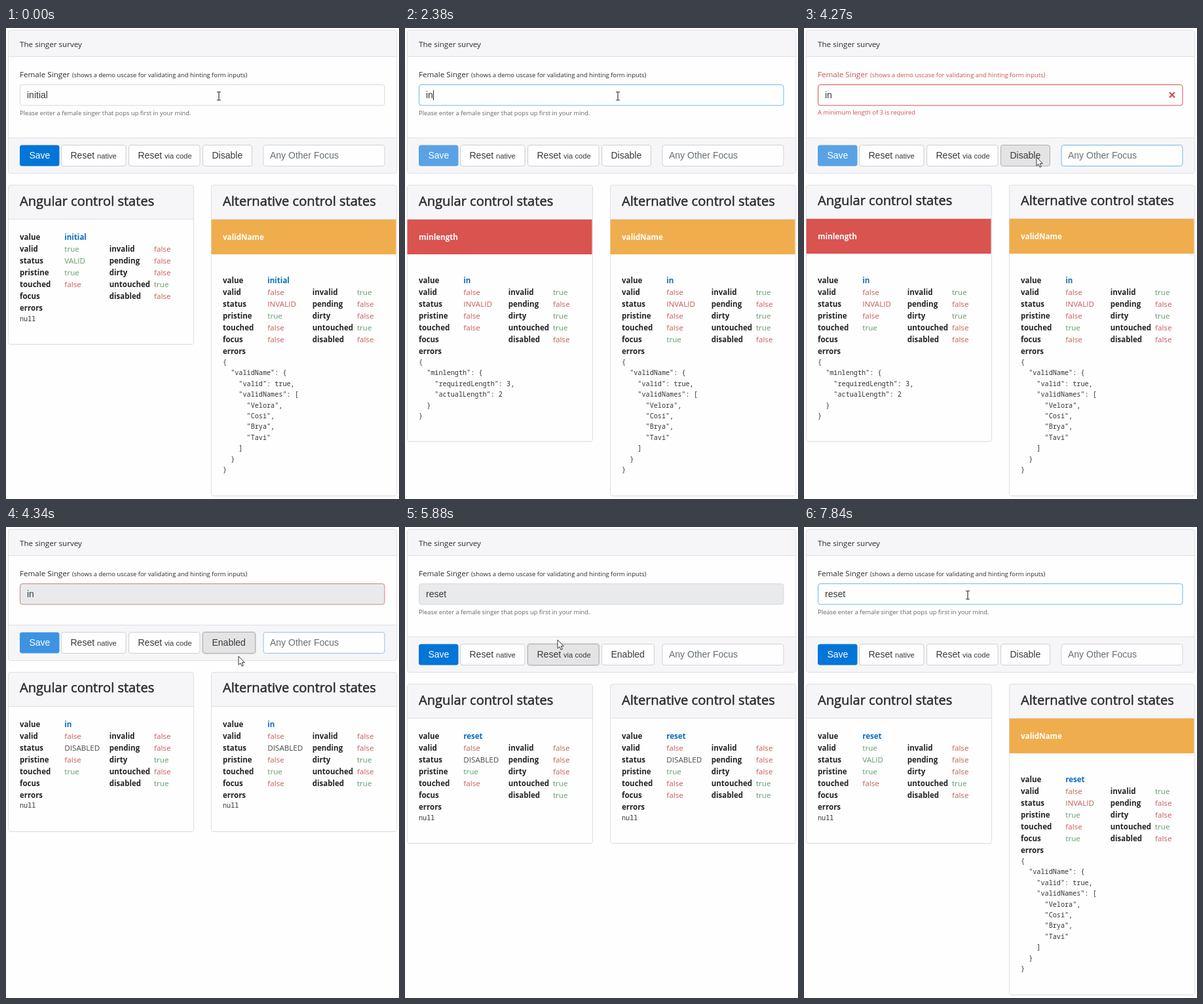
These frames come from a looping animation (600x718 px, 8000 ms). An HTML page:

```html
<!DOCTYPE html>
<html lang="en">
<head>
<meta charset="utf-8">
<title>Form control states</title>
<style>
  html, body { margin: 0; width: 100%; height: 100%; overflow: hidden; background: #fefefe; }
  svg { display: block; width: 600px; height: 718px; }
  text { white-space: pre; font: 11.65px "Open Sans", "Noto Sans", sans-serif; fill: #292b2c; }
  .small { font-size: 9.43px; }
  .hint { font-size: 9.4px; fill: #5f676c; }
  .title { font-size: 20.1px; stroke: #292b2c; stroke-width: .5; }
  .key { font-size: 11.5px; font-weight: 700; fill: #222425; }
  .value { font-size: 11.5px; font-weight: 700; fill: #0a6cbf; }
  .banner { font-weight: 700; fill: #fff; }
  .yes { fill: #629c6b; }
  .no { fill: #c85a58; }
  .off { fill: #46494c; }
  .code { font: 10.17px "Noto Sans Mono", "DejaVu Sans Mono", monospace; fill: #333; }
  .ui { font: 14px "Liberation Sans", Arial, sans-serif; fill: #36393b; }
  .ui tspan { font-size: 11.2px; }
  .soft { fill: #666e74; }
  .bright { fill: #fff; }
  text.red { fill: #cb5250; }
</style>
</head>
<body>
<svg id="stage" viewBox="0 0 600 718"></svg>
<script>
const LOOP = 8000, STEP = 70;
const stage = document.getElementById('stage');
const pen = document.createElement('canvas').getContext('2d');
pen.font = '14px "Liberation Sans", Arial, sans-serif';

const PANEL = '#f6f6f9', PAGE = '#fefefe', LINE = '#dfdfe4';
const NAMES = ['Velora', 'Cosi', 'Brya', 'Tavi'];

// What the form does, as changes to its state
const EVENTS = [
  [0, { value: 'initial', focus: '', caret: false, pristine: true, touched: false, short: false, disabled: false }],
  [280, { focus: 'name', caret: true }],
  [560, { caret: false }],
  [840, { caret: true }],
  [1120, { caret: false }],
  [1260, { value: 'initia', pristine: false, caret: true }],
  [1400, { value: 'initi' }],
  [1610, { value: 'init' }],
  [1750, { value: 'ini' }],
  [1890, { value: 'in' }],
  [2030, { short: true }],
  [2170, { caret: false }],
  [2380, { caret: true }],
  [2660, { caret: false }],
  [2940, { caret: true }],
  [3220, { focus: 'other', touched: true, caret: false }],
  [4340, { focus: 'toggle', disabled: true }],
  [5880, { focus: 'code', value: 'reset', pristine: true, touched: false, short: false }],
  [6930, { focus: 'toggle', disabled: false }],
  [7630, { focus: 'name', caret: true }],
  [7840, { caret: false }]
];

// Pointer way: time, x, y
const WAY = [
  [0, 325, 104], [2590, 325, 104], [2940, 452, 192],
  [3570, 452, 192], [4060, 355, 197],
  [4900, 355, 197], [5110, 239, 155], [5460, 233, 172],
  [6300, 233, 172], [6650, 361, 193],
  [7210, 361, 193], [7490, 250, 104], [LOOP, 250, 104]
];

function stateAt(t) {
  const s = {};
  for (const [at, change] of EVENTS) if (at <= t) Object.assign(s, change);
  s.failed = s.touched && s.short && !s.disabled;
  return s;
}

function pointerAt(t) {
  const i = WAY.findIndex(p => p[0] > t);
  const [a, b] = [WAY[i - 1], WAY[i]];
  const k = (t - a[0]) / (b[0] - a[0]);
  return { x: a[1] + (b[1] - a[1]) * k, y: a[2] + (b[2] - a[2]) * k };
}

// Three-step colour fade after a change of state
function fade(t, pick) {
  const shades = [0, 1, 2].map(n => pick(stateAt(Math.max(0, t - n * STEP))));
  return `rgb(${[0, 1, 2].map(c => Math.round(shades.reduce((sum, s) => sum + s[c], 0) / 3))})`;
}

const borderShade = s =>
  s.focus === 'name' ? [116, 184, 230] : s.failed ? [207, 86, 84] : [217, 217, 220];
const otherShade = s => s.focus === 'other' ? [116, 184, 230] : [211, 211, 214];
const saveShade = s => s.short && !s.disabled ? [90, 162, 230] : [2, 117, 216];

const text = (x, y, body, cls = '') => `<text x="${x}" y="${y}" class="${cls}">${body}</text>`;

const rect = (x, y, w, h, fill, extra = '') =>
  `<rect x="${x}" y="${y}" width="${w}" height="${h}" fill="${fill}" ${extra}/>`;

const box = (x, y, w, h, fill, stroke) =>
  rect(x + .5, y + .5, w - 1, h - 1, fill, `rx="3.5" stroke="${stroke}"`);

const rule = (x, y, w) => rect(x, y, w, 1, LINE);

function button(x, y, w, body, lit, focused) {
  const ring = focused ? rect(x - .5, y - .5, w + 1, 34, 'none', 'rx="4" stroke="#ccc" stroke-opacity=".5" stroke-width="1.5"') : '';
  const on = lit || focused;
  return ring + box(x, y, w, 33, on ? '#e4e4e5' : PAGE, on ? '#b0b0b2' : '#d0d0d2') + text(x + 14.5, y + 21, body, 'ui');
}

function form(s, t, p) {
  const dy = s.disabled && s.touched ? -18 : 0;
  const red = s.failed ? 'red' : '';
  const top = 178 + dy;
  const over = (x, w) => p.x >= x && p.x <= x + w && p.y >= top && p.y <= top + 33;
  const toggleWidth = s.disabled ? 81 : 76;
  let out = box(3, 3, 594, 219 + dy, PANEL, LINE)
    + rect(4, 44, 592, 123 + dy, PAGE) + rule(4, 43, 592) + rule(4, 167 + dy, 592)
    + text(21, 28.5, 'The singer survey')
    + text(21, 75, 'Female Singer', red)
    + text(101, 75, '(shows a demo uscase for validating and hinting form inputs)', 'small ' + red)
    + box(21, 86, 557.5, 32.5, s.disabled ? '#e9eaec' : PAGE, fade(t, borderShade))
    + text(32, 107, s.value, 'ui');
  if (s.caret) out += rect(Math.round(32 + pen.measureText(s.value).width), 95, 1, 15, '#222');
  if (s.failed) {
    out += '<path d="M558 98l8 8m0-8l-8 8" stroke="#cf4b48" stroke-width="2.2"/>'
      + text(21, 132, 'A minimum length of 3 is required', 'hint red');
  } else if (!dy) {
    out += text(21, 133, 'Please enter a female singer that pops up first in your mind.', 'hint');
  }
  return out
    + rect(21, top + .5, 60.5, 32, fade(t, saveShade), 'rx="3.5"')
    + text(35.5, top + 21, 'Save', 'ui bright')
    + button(84, top, 99.5, 'Reset <tspan>native</tspan>', over(84, 99))
    + button(187, top, 109.5, 'Reset <tspan>via code</tspan>', over(187, 109), s.focus === 'code')
    + button(300, top, toggleWidth, s.disabled ? 'Enabled' : 'Disable', over(300, toggleWidth), s.focus === 'toggle')
    + box(392.5, top, 186, 33, PAGE, fade(t, otherShade))
    + text(403, top + 21, 'Any Other Focus', 'ui soft');
}

function card(x, s, title, error, color, focus) {
  const dy = s.disabled && s.touched ? -18 : 0;
  const y = 239 + dy;
  const nudge = s.failed ? -1 : 0;
  const bad = error && !s.disabled;
  const lines = bad ? JSON.stringify(error, null, 2).split('\n') : ['null'];
  const first = y + 84.4 + (bad ? 66 : 0) + (dy ? -.5 : 0);
  const height = 244 + (bad ? 66 : 0) + (lines.length - 1) * 16.45;
  const status = s.disabled ? 'DISABLED' : error ? 'INVALID' : 'VALID';
  const valid = !s.disabled && !error;

  let out = box(x, y, 284, Math.round(height), PANEL, LINE)
    + rect(x + 1, y + 53 + nudge, 282, Math.round(height) - 55 - nudge, PAGE)
    + rule(x + 1, y + 52 + nudge, 282)
    + text(x + 18, y + 31.5 + nudge + (dy ? -.5 : 0), title, 'title');
  if (bad) {
    out += rect(x + .5, y + 53 + nudge, 282, 53, color)
      + text(x + 18, y + 84.4 + nudge, Object.keys(error)[0], 'banner');
  }

  const flag = v => v === '' ? ['', ''] : [String(v), v ? 'yes' : 'no'];
  const left = [
    ['value', [s.value, 'value']],
    ['valid', flag(valid)],
    ['status', [status, s.disabled ? 'off' : error ? 'no' : 'yes']],
    ['pristine', flag(s.pristine)],
    ['touched', flag(s.touched)],
    ['focus', flag(focus)],
    ['errors', flag('')]
  ];
  const right = [
    ['invalid', flag(!!bad)],
    ['pending', flag(false)],
    ['dirty', flag(!s.pristine)],
    ['untouched', flag(!s.touched)],
    ['disabled', flag(s.disabled)]
  ];
  const column = (rows, cx, cy) => rows.map(([key, [v, cls]], i) =>
    text(cx, cy + i * 18, key, 'key') + (v ? text(cx + 68.3, cy + i * 18, v, cls) : '')).join('');

  return out + column(left, x + 18, first) + column(right, x + 154.7, first + 18)
    + lines.map((line, i) => text(x + 18, first + 123.5 + i * 16.4, line, 'code')).join('');
}

function pointer(s, p) {
  const inName = p.y > 86 && p.y < 119 && p.x > 21 && p.x < 578;
  const inOther = p.y > 178 && p.y < 211 && p.x > 392 && p.x < 578;
  const at = `transform="translate(${p.x.toFixed(1)} ${p.y.toFixed(1)})"`;
  return inName && !s.disabled || inOther
    ? `<path ${at} d="M-3 -6.5h2.2q.8 0 .8 1V5q0 1 -.8 1H-3M3 -6.5H.8Q0 -6.5 0 -5.5M0 5q0 1 .8 1H3" fill="none" stroke="#333" stroke-width="1.2"/>`
    : `<path ${at} d="M0 0V13.2L3 10.5L5.2 15.2L7.3 14.2L5.2 9.7H9.3Z" fill="#fff" stroke="#333" stroke-width="1"/>`;
}

function picture(t) {
  const s = stateAt(t), p = pointerAt(t);
  const tooShort = s.short ? { minlength: { requiredLength: 3, actualLength: s.value.length } } : null;
  const unknown = { validName: { valid: true, validNames: NAMES } };
  return rect(0, 0, 600, 718, PAGE)
    + form(s, t, p)
    + card(3, s, 'Angular control states', tooShort, '#d9534f', '')
    + card(313, s, 'Alternative control states', unknown, '#f0ad4e', s.focus === 'name')
    + pointer(s, p);
}

let shown = -1;
function tick() {
  const t = Math.floor(performance.now() % LOOP / STEP) * STEP;
  if (t !== shown) stage.innerHTML = picture(shown = t);
  requestAnimationFrame(tick);
}
tick();
</script>
</body>
</html>
```
